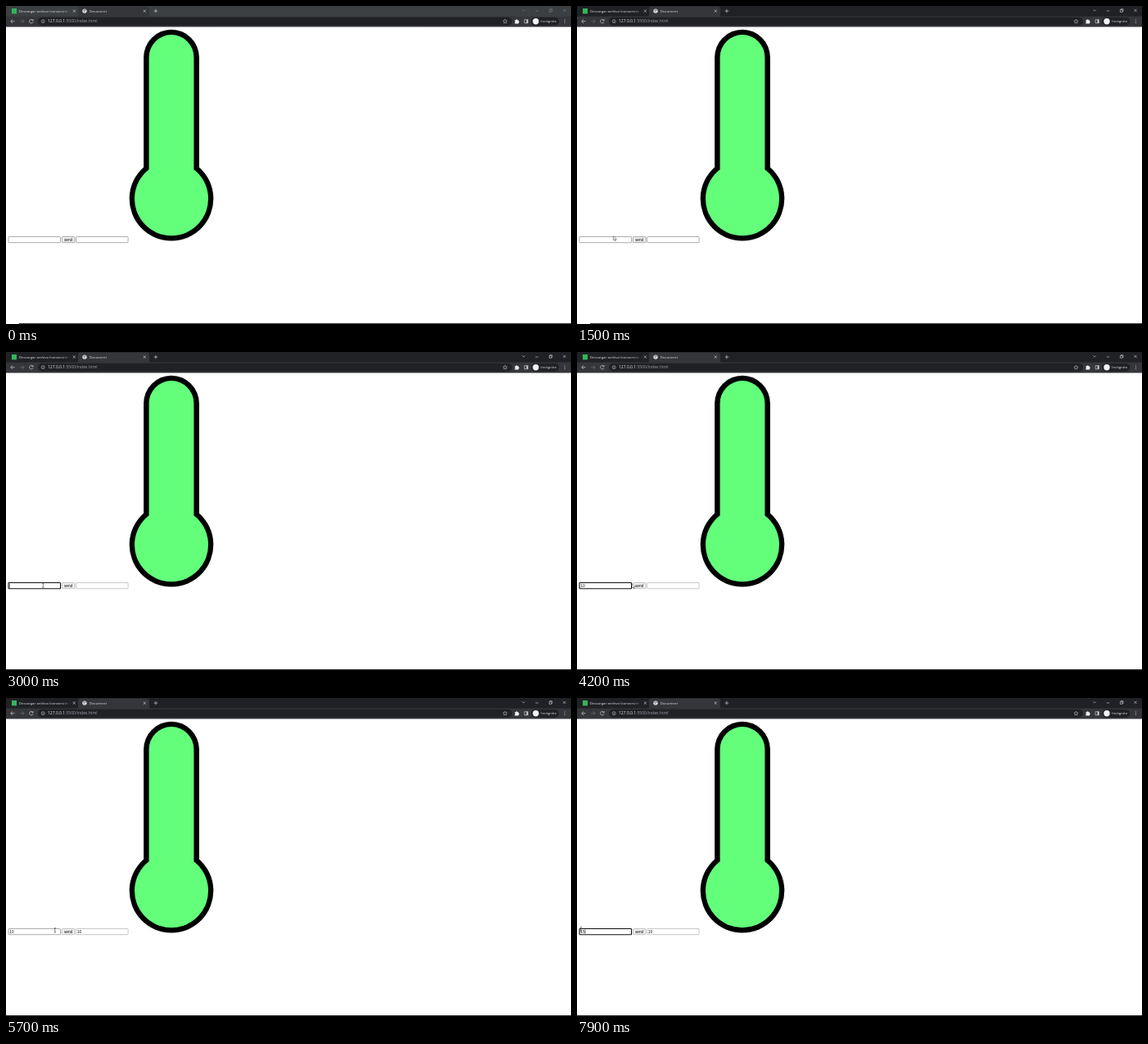
These frames come from a looping animation (690x388 px, 8 s). An HTML page:

```html
<!DOCTYPE html>
<html lang="es">
<head>
<meta charset="utf-8">
<title>Document</title>
<style>
  html, body { margin: 0; width: 100%; height: 100%; overflow: hidden; background: #fff; }
  svg { display: block; width: 690px; height: 388px; --frame: #3c4043; --control: #777a7d; }
  svg.active { --frame: #202124; --control: #d5d6d8; }
  text { white-space: pre; }
  .ui { font: 4.35px "Open Sans", "Noto Sans", sans-serif; fill: #dfe1e5; }
  .url { font-size: 5px; }
  .form { font: 4.8px "Liberation Sans", Arial, sans-serif; fill: #111; }
  .line { fill: none; stroke: #d5d6d8; stroke-width: .65; }
  .control { fill: none; stroke: var(--control); stroke-width: .6; }
  .field { fill: #fff; stroke: #767676; stroke-width: .6; }
  .soft { stroke: #a2a2a2; }
  .focused { stroke: #101010; stroke-width: 1.1; }
</style>
</head>
<body>
<svg id="stage" viewBox="0 0 690 388">
  <defs>
    <linearGradient id="fade">
      <stop offset="0" style="stop-color: var(--frame); stop-opacity: 0"/>
      <stop offset="1" style="stop-color: var(--frame)"/>
    </linearGradient>
    <path id="cross" d="M-1.6-1.6 1.6 1.6M1.6-1.6-1.6 1.6"/>
  </defs>

  <!-- Tab strip -->
  <rect width="690" height="13" style="fill: var(--frame)"/>
  <rect x="7" y="3" width="6" height="6.4" fill="#35b558"/>
  <text class="ui" x="15.8" y="7.7">Descargar archivo (conversión fi</text>
  <rect x="68" y="2" width="11" height="8" fill="url(#fade)"/>
  <rect x="79" y="2" width="9" height="8" style="fill: var(--frame)"/>
  <path d="M86 13q2 0 2-2V3q0-2.6 2.6-2.6h81.8q2.6 0 2.6 2.6v8q0 2 2 2z" fill="#35363a"/>
  <circle cx="96" cy="6.1" r="2.7" fill="#e2e4e6"/>
  <path d="M94 4.8l1.9.4-.6 1.4 1.2 1.4M96.3 3.9l.3 1.2 1.5.4" fill="none" stroke="#45474b" stroke-width=".6"/>
  <text class="ui" x="101.8" y="7.7">Document</text>
  <g class="line">
    <use href="#cross" x="83.3" y="6.1"/>
    <use href="#cross" x="169.3" y="6.1"/>
    <path d="M180.6 6.1h4.6M182.9 3.8v4.6"/>
  </g>
  <g class="control">
    <path d="M630.4 4.4l1.7 1.7 1.7-1.7M646.6 6h3.6M663.4 4.6h2.7v2.8h-2.7zM664.2 4.6v-.9h2.8v2.8h-.9"/>
    <use href="#cross" x="682" y="5.4"/>
  </g>

  <!-- Toolbar -->
  <rect y="12.6" width="690" height="12.9" fill="#35363a"/>
  <rect x="39" y="13.8" width="579" height="10" rx="5" fill="#202124"/>
  <g class="line">
    <path d="M10.6 18.7H5.8M8 16.4l-2.3 2.3L8 21"/>
    <path d="M17.2 18.7H22M19.8 16.4l2.3 2.3-2.3 2.3" stroke="#727579"/>
    <path d="M32.6 17.2a2.3 2.3 0 1 0 .4 2.3M33.1 16v1.9h-1.9"/>
    <circle cx="45.2" cy="18.7" r="2" stroke-width=".5"/>
    <path d="M45.2 18.4v1.4M45.2 17.3v.5"/>
    <path d="M609.5 16.2l.8 1.7 1.8.2-1.4 1.2.4 1.8-1.6-.9-1.6.9.4-1.8-1.4-1.2 1.8-.2z" stroke-width=".5"/>
    <path d="M633.1 16.7h4.2v4.1h-4.2z"/>
    <path d="M636.4 16.7v4.1" stroke-width="1.5"/>
  </g>
  <text class="ui url" x="51" y="20.4">127.0.0.1<tspan fill="#9aa0a6">:5500/index.html</tspan></text>
  <path d="M621.4 17.2h1.3a.9.9 0 0 1 1.8 0h1.4v1.3a.9.9 0 0 1 0 1.8v1.2h-4.5v-1.4a.8.8 0 0 0 0-1.5z" fill="#f1f3f4"/>
  <rect x="641.3" y="13.9" width="34" height="9.8" rx="4.9" fill="#202124"/>
  <circle cx="647" cy="18.7" r="3.7" fill="#f1f3f4"/>
  <text class="ui" x="653.2" y="20.3">Incógnito</text>
  <path d="M682.4 16.8v.01m0 1.9v.01m0 1.9v.01" stroke="#d5d6d8" stroke-width=".9" stroke-linecap="round"/>

  <!-- Thermometer -->
  <path d="M168.1 196.7V62.6a33.9 33.9 0 0 1 67.8 0V196.7A51.3 51.3 0 1 1 168.1 196.7z"/>
  <path d="M174.6 199.5V62.5a27.4 27.4 0 0 1 54.8 0V199.5A45 45 0 1 1 174.6 199.5z" fill="#63ff7b"/>

  <!-- Form -->
  <rect id="input" class="field" x="3" y="281.5" width="63.5" height="7.2" rx=".7"/>
  <rect id="button" class="field" x="68.3" y="281.5" width="15.6" height="7.2" rx="1" style="fill: #efefef"/>
  <rect id="output" class="field" x="85.6" y="281.5" width="63.5" height="7.2" rx=".7"/>
  <rect id="selection" x="4.2" y="282.3" width="5.6" height="5.7" fill="#1a73e8"/>
  <g class="form">
    <text id="typed" x="4.3" y="286.8"></text>
    <text x="76.1" y="286.7" text-anchor="middle">send</text>
    <text id="result" x="86.8" y="286.8"></text>
  </g>
  <rect id="caret" y="282.4" width=".5" height="5.4"/>
  <path id="edge" d="M0 387.5H690" stroke="#38393b"/>

  <g id="arrow">
    <path d="M0 0v5.4l1.3-1.2.9 2 .9-.4-.9-1.9h1.7z" fill="#fff" stroke="#222" stroke-width=".45"/>
  </g>
  <path id="beam" d="M-1.2-2.7q1.2 0 1.2.5 0-.5 1.2-.5M0-2.2v4.4M-1.2 2.7Q0 2.7 0 2.2q0 .5 1.2.5" fill="none" stroke="#222" stroke-width=".6"/>
</svg>
<script>
const LOOP = 8000;
const $ = id => document.getElementById(id);
const show = (id, on) => $(id).setAttribute('visibility', on ? 'visible' : 'hidden');

// Each track is a list of [start time, ...values], held until the next entry.
const pointer = [
  [0, '', 0, 0],
  [600, 'arrow', 270, 301], [700, 'arrow', 115, 257], [800, 'arrow', 69, 232],
  [900, 'arrow', 48, 215], [1000, 'arrow', 39, 242], [1100, 'arrow', 41, 268],
  [1200, 'arrow', 44.4, 280.6],
  [1700, 'beam', 45.3, 284.6],
  [4000, 'beam', 49, 281], [4100, 'beam', 58, 278], [4200, 'arrow', 67, 282.6],
  [4300, 'arrow', 71, 284.5], [4400, 'arrow', 75.5, 286],
  [5400, 'arrow', 74, 284], [5500, 'arrow', 69, 281.5],
  [5600, 'beam', 63, 283], [5700, 'beam', 59.8, 283.4],
  [5900, 'beam', 32, 284], [6000, 'beam', 12, 284.5],
  [6200, 'beam', 7, 283.5], [6300, 'beam', 4, 282.5], [6400, 'arrow', 1, 280],
  [6800, 'beam', 4.8, 282.2]
];
const typing = [[0, ''], [3200, '1'], [3300, '10'], [7800, '1'], [7900, '15']];
const caretTimes = [[0, 0], [1900, 1], [2400, 0], [2900, 1], [3800, 0], [4300, 1], [4600, 0], [7800, 1]];

const at = (track, t) => track.findLast(([start]) => start <= t).slice(1);
const between = (t, a, b) => t >= a && t < b;

function draw(t) {
  const [kind, x, y] = at(pointer, t);
  const [typed] = at(typing, t);
  const selected = between(t, 6200, 7800);

  $('stage').classList.toggle('active', t >= 1500);
  $('input').classList.toggle('focused', between(t, 1800, 4600) || t >= 6200);
  for (const id of ['button', 'output']) $(id).classList.toggle('soft', t >= 2900);

  $('typed').textContent = typed;
  $('typed').style.fill = selected ? '#fff' : '';
  $('result').textContent = t >= 4600 ? '10' : '';
  show('selection', selected);
  show('caret', at(caretTimes, t)[0]);
  $('caret').setAttribute('x', 4.4 + 2.67 * typed.length);
  $('edge').setAttribute('d', t >= 2900 ? 'M0 387.5H690' : 'M16 387.5H690');

  for (const id of ['arrow', 'beam']) {
    show(id, id === kind);
    $(id).setAttribute('transform', `translate(${x} ${y})`);
  }
}

const start = performance.now();
function tick() {
  draw((performance.now() - start) % LOOP);
  requestAnimationFrame(tick);
}
tick();
</script>
</body>
</html>
```
